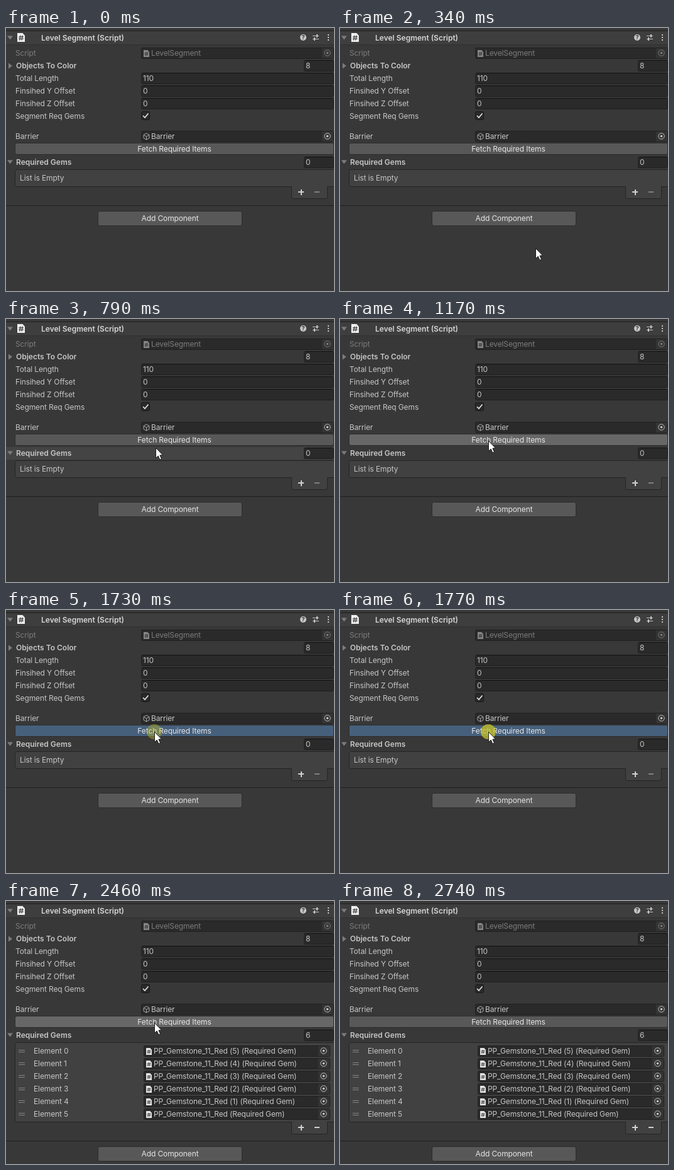
These frames come from a looping animation (522 px wide and 417 px high, 3900 ms). An HTML page with a canvas:

```html
<!DOCTYPE html>
<html lang="en">
<head>
<meta charset="utf-8">
<title>Inspector</title>
<style>
html, body { margin: 0; width: 100%; height: 100%; overflow: hidden; background: #383838; }
canvas { display: block; }
</style>
</head>
<body>
<canvas width="522" height="417"></canvas>
<script>
const c = document.querySelector('canvas').getContext('2d');
const LOOP = 3900, PRESS = 1730, FILLED = 1900;
const LIGHT = '#c6c6c6', DIM = '#7c7c7c';

// Pointer waypoints: time, x, y
const enter = [[160, 395, 408], [340, 311, 349], [500, 288, 309], [650, 271, 277],
  [790, 238, 204], [910, 236, 194], [1169, 236, 194], [1170, 236, 193]];
const leave = [[2460, 236, 193], [2540, 250, 230], [2640, 290, 310], [2740, 345, 417]];

function pointer(t) {
  if (t < 160 || t >= 2740) return null;
  const path = t < 2460 ? enter : leave;
  const i = path.findIndex(p => p[0] > t);
  if (i < 0) return path.at(-1).slice(1);
  const [a, b] = [path[i - 1], path[i]], k = (t - a[0]) / (b[0] - a[0]);
  return [1, 2].map(n => Math.round(a[n] + (b[n] - a[n]) * k));
}

function rect(x, y, w, h, color) {
  c.fillStyle = color;
  c.fillRect(x, y, w, h);
}

function box(x, y, w, h, fill, edge, r = 2) {
  c.beginPath();
  c.roundRect(x + .5, y + .5, w - 1, h - 1, r);
  c.fillStyle = fill;
  c.fill();
  c.strokeStyle = edge;
  c.lineWidth = 1;
  c.stroke();
}

function text(s, x, y, color = LIGHT, bold = false, align = 'left') {
  c.font = (bold ? '600 ' : '') + '12px Inter, sans-serif';
  c.letterSpacing = bold ? '0px' : '-0.12px';
  c.textAlign = align;
  c.fillStyle = color;
  c.fillText(s, x, y + 4);
}

function poly(color, ...p) {
  c.beginPath();
  for (let i = 0; i < p.length; i += 2) c.lineTo(p[i], p[i + 1]);
  c.closePath();
  c.fillStyle = color;
  c.fill();
}

function line(color, width, ...p) {
  c.beginPath();
  for (let i = 0; i < p.length; i += 2) c.lineTo(p[i], p[i + 1]);
  c.strokeStyle = color;
  c.lineWidth = width;
  c.stroke();
}

function disc(x, y, r, color) {
  c.beginPath();
  c.arc(x, y, r, 0, 7);
  c.fillStyle = color;
  c.fill();
}

function arrow(y, open) {
  if (open) poly('#7c7c7c', 2, y - 3, 11, y - 3, 6.5, y + 3);
  else poly('#7c7c7c', 4, y - 4.5, 10, y, 4, y + 4.5);
}

function scriptIcon(x, y, w, h, paper) {
  poly(paper, x, y, x + w * .7, y, x + w, y + h * .28, x + w, y + h, x, y + h);
  const cx = x + w / 2, cy = y + h * .54, u = w * .13, l = w * .33;
  for (const d of [-u, u]) {
    line('#333', w / 11, cx + d + u / 2, cy - l, cx + d - u / 2, cy + l);
    line('#333', w / 11, cx - l, cy + d, cx + l, cy + d);
  }
}

function field(x, y, w, value) {
  box(x, y - 9, w, 18, '#2a2a2a', '#1f1f1f');
  rect(x + 2, y - 9, w - 4, 1, '#111');
  if (value) text(value, x + 3, y);
}

function objectField(x, y, w, value, color = LIGHT, hover = false) {
  box(x, y - 9, w, 18, '#2a2a2a', hover ? '#656565' : '#202020');
  rect(x + w - 19, y - 8, 18, 16, '#343434');
  text(value, x + 16, y, color);
  const px = x + w - 10.5;
  c.beginPath();
  c.arc(px, y - .5, 4.7, 0, 7);
  c.strokeStyle = color;
  c.lineWidth = 1;
  c.stroke();
  disc(px, y - .5, 1.8, color);
}

function button(x, y, w, h, label, fill) {
  box(x, y, w, h, fill, '#2c2c2c', 3);
  text(label, x + w / 2, y + h / 2, '#e6e6e6', false, 'center');
}

function header() {
  rect(0, 4, 522, 1, '#1e1e1e');
  rect(0, 5, 522, 21, '#3e3e3e');
  rect(0, 26, 522, 1, '#303030');
  arrow(15.5, true);
  scriptIcon(18, 8, 12, 14, '#f0f0f0');
  text('Level Segment (Script)', 56, 16, '#d6d6d6', true);
  disc(473, 15, 5, LIGHT);
  c.font = 'bold 9px Inter, sans-serif';
  c.textAlign = 'center';
  c.fillStyle = '#333';
  c.fillText('?', 473, 18.3);
  line(LIGHT, 1, 488, 12.5, 498, 12.5);
  line(LIGHT, 1, 488, 17.5, 498, 17.5);
  rect(494, 10, 2, 5, LIGHT);
  rect(490, 15, 2, 5, LIGHT);
  for (const y of [10, 14, 18]) rect(512, y, 2, 2, LIGHT);
}

function fields() {
  text('Script', 15, 40, DIM);
  objectField(215, 40, 307, 'LevelSegment', DIM);
  scriptIcon(219, 35, 9, 11, '#858585');
  arrow(60, false);
  text('Objects To Color', 16, 60, LIGHT, true);
  field(474, 60, 48, '8');
  [['Total Length', '110'], ['Finsihed Y Offset', '0'], ['Finsihed Z Offset', '0']]
    .forEach(([name, value], i) => {
      text(name, 15, 80 + i * 20);
      field(215, 80 + i * 20, 307, value);
    });
  text('Segment Req Gems', 15, 140);
  box(215, 132, 14, 14, '#2a2a2a', '#181818');
  line('#e8e8e8', 1.6, 218, 139, 221, 142, 226.5, 135.5);
  text('Barrier', 15, 172);
  objectField(215, 172, 307, 'Barrier');
  line('#aaa', 1, 223.5, 167, 228, 169.5, 228, 174.5, 223.5, 177, 219, 174.5, 219, 169.5, 223.5, 167);
  line('#aaa', 1, 219, 169.5, 223.5, 172, 228, 169.5);
  line('#aaa', 1, 223.5, 172, 223.5, 177);
}

function gemList(full, over) {
  const bottom = full ? 350 : 251;
  if (over(0, 203, 522, 20)) rect(0, 203, 522, 20, '#444');
  arrow(212.5, true);
  text('Required Gems', 16, 213, LIGHT, true);
  field(474, 213, 48, full ? '6' : '0');
  box(454, bottom - 2, 58, full ? 22 : 22, '#414141', '#242424', 3);
  box(14, 224, 510, bottom - 223, '#414141', '#242424', 3);
  rect(455, bottom - 1, 56, 2, '#414141');
  const y = full ? 359 : 260;
  rect(465, y - 1, 9, 2, '#d0d0d0');
  rect(469, y - 4, 2, 9, '#d0d0d0');
  rect(491, y - 1, 8, 2, full ? '#d0d0d0' : '#808080');
  if (!full) return text('List is Empty', 22, 238);
  for (let i = 0; i < 6; i++) {
    const y = 238 + i * 20, copy = i < 5 ? ` (${5 - i})` : '';
    rect(20, y - 2, 10, 1, '#858585');
    rect(20, y + 1, 10, 1, '#858585');
    text('Element ' + i, 44, y);
    objectField(219, y, 297, `PP_Gemstone_11_Red${copy} (Required Gem)`, LIGHT, over(219, y - 9, 297, 18));
    scriptIcon(223, y - 5, 9, 11, '#e4e4e4');
  }
}

function cursor(x, y) {
  c.save();
  c.translate(x + .5, y + .5);
  poly('#fff', 0, 0, 0, 16, 3.7, 12.5, 6.4, 18.5, 9, 17.3, 6.4, 11.5, 11, 11.3);
  c.strokeStyle = '#111';
  c.lineWidth = .9;
  c.stroke();
  c.restore();
}

function draw(t) {
  const p = pointer(t), full = t >= FILLED, pressed = t >= PRESS && !full;
  const over = (x, y, w, h) => p && p[0] >= x && p[0] < x + w && p[1] >= y && p[1] < y + h;
  const tint = (...area) => over(...area) ? '#676767' : '#585858';
  rect(0, 0, 522, 417, '#383838');
  header();
  fields();
  button(14, 182, 508, 19, 'Fetch Required Items', pressed ? '#46607c' : tint(14, 182, 508, 19));
  gemList(full, over);
  const end = full ? 380 : 281;
  rect(0, end, 522, 1, '#1e1e1e');
  button(146, end + 9, 230, 24, 'Add Component', tint(146, end + 9, 230, 24));
  if (pressed) disc(236, 193, 12, `rgba(200,195,35,${t < 1770 ? .4 : .75})`);
  if (p) cursor(...p);
}

function frame() {
  draw(performance.now() % LOOP);
  requestAnimationFrame(frame);
}
frame();
</script>
</body>
</html>
```
